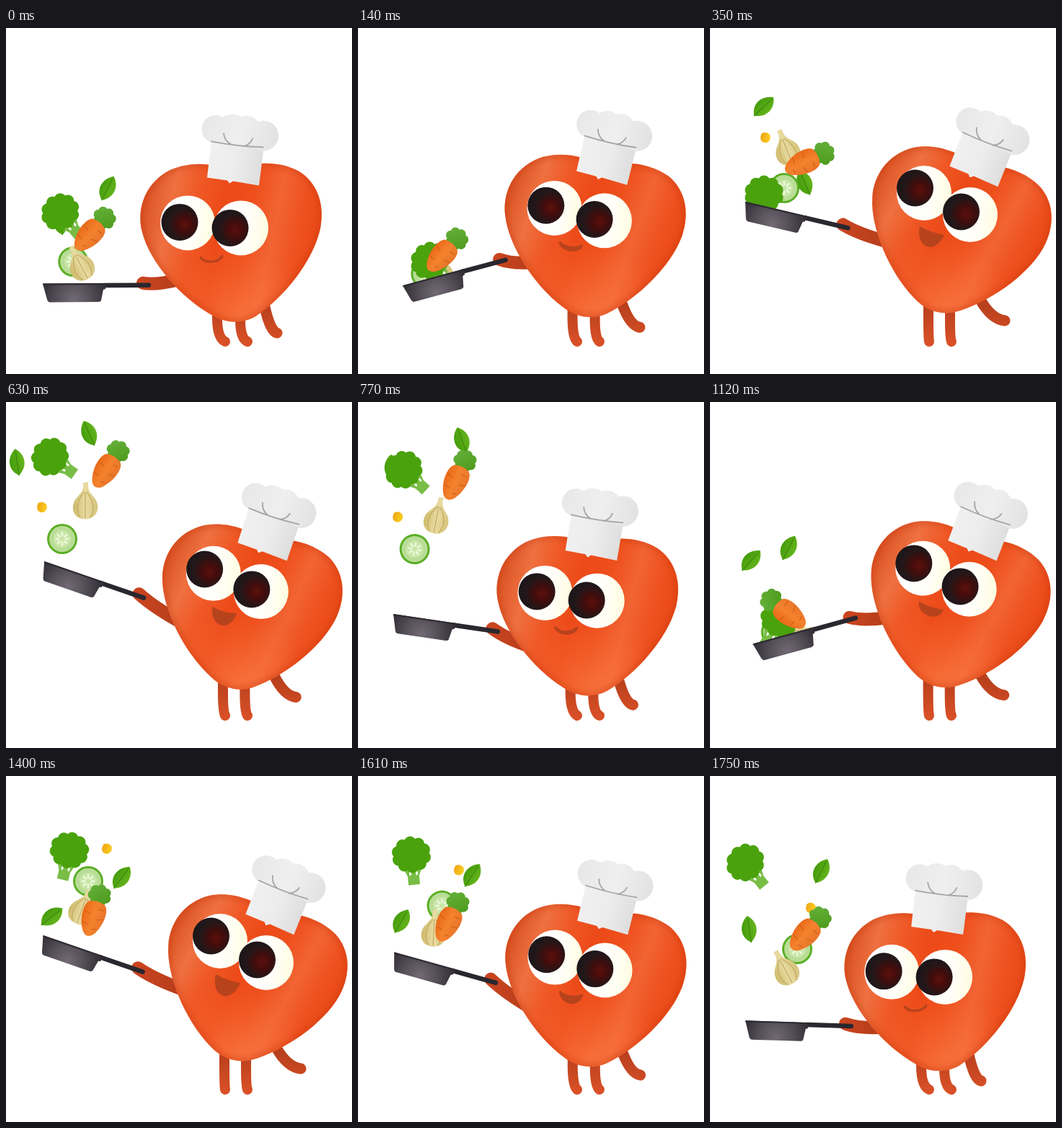
Recreate the animation shown at these times as an HTML page with a canvas. Size 480x480 px, loop 1820 ms.

```html
<!DOCTYPE html>
<html lang="en">
<head>
<meta charset="utf-8">
<title>Heart chef tossing vegetables</title>
<style>
  html, body { margin: 0; width: 100%; height: 100%; overflow: hidden; background: #fff; }
  canvas { display: block; width: 100vmin; height: 100vmin; }
</style>
</head>
<body>
<canvas id="stage" width="480" height="480"></canvas>
<script>
const ctx = document.getElementById('stage').getContext('2d');
const LOOP = 1820, SWING = LOOP / 2, STEP = 70;

// --- easing ---
const ramp = (t, from, to) => Math.min(1, Math.max(0, (t - from) / (to - from)));
const smooth = u => u * u * (3 - 2 * u);
const easeIn = u => u * u;
const easeOut = u => 1 - (1 - u) * (1 - u);
const hold = (t, rise, top, fall, end) => smooth(ramp(t, rise, top)) - smooth(ramp(t, fall, end));
const bump = (t, center, half) => Math.cos(Math.min(1, Math.abs(t - center) / half) * Math.PI / 2) ** 2;
const mix = (a, b, u) => a.map((v, i) => v + (b[i] - v) * u);

// --- drawing helpers ---
function placed([x, y, turn], draw) {
  ctx.save();
  ctx.translate(x, y);
  ctx.rotate(turn * Math.PI / 180);
  draw();
  ctx.restore();
}
function fill(path, paint) {
  ctx.fillStyle = paint;
  ctx.fill(new Path2D(path));
}
function line(path, paint, width) {
  ctx.strokeStyle = paint;
  ctx.lineWidth = width;
  ctx.lineCap = ctx.lineJoin = 'round';
  ctx.stroke(new Path2D(path));
}
function oval(x, y, rx, ry, paint) {
  ctx.fillStyle = paint;
  ctx.beginPath();
  ctx.ellipse(x, y, rx, ry, 0, 0, 7);
  ctx.fill();
}
function stops(gradient, colors) {
  colors.forEach((color, i) => gradient.addColorStop(i / (colors.length - 1), color));
  return gradient;
}
const linear = (x0, y0, x1, y1, ...colors) => stops(ctx.createLinearGradient(x0, y0, x1, y1), colors);
const radial = (x, y, r, ...colors) => stops(ctx.createRadialGradient(x, y, 0, x, y, r), colors);

// --- vegetables ---
function florets(rx, ry, size, count, paint) {
  oval(0, 0, rx, ry, paint);
  for (let i = 0; i < count; i++) {
    const a = i / count * 2 * Math.PI - Math.PI / 2;
    oval(Math.cos(a) * rx, Math.sin(a) * ry, size, size, paint);
  }
}
function leaf() {
  fill('M1 -19C14 -9 14 8 0 18C-14 9 -13 -9 1 -19', linear(-12, 0, 12, 0, '#429a0a', '#66b51d'));
  line('M1 -15L0 18', '#3b870c', 1.2);
}
function corn() {
  fill('M-6 -5Q0 -10 6 -4Q9 3 2 7Q-6 8 -7 1Z', linear(-6, 0, 7, 3, '#f0a916', '#fbd21f'));
}
function cucumber() {
  oval(0, 0, 21, 21, '#5bae25');
  oval(0, 0, 18, 18, '#b9dd96');
  oval(0, 0, 12, 12, '#c8e6a8');
  for (let i = 0; i < 8; i++) {
    placed([0, 0, i * 45], () => oval(0, -6.5, 1.4, 3.4, '#edf8d9'));
  }
}
function garlic() {
  fill('M-3 -30L4 -31C3 -20 6 -17 12 -10C20 -1 19 14 8 19Q0 22 -8 19C-19 14 -20 -1 -11 -10C-5 -17 -2 -20 -3 -30',
    linear(-17, 0, 17, 0, '#cdb968', '#e9dba2', '#d5c37b'));
  line('M-2 -17C-12 -4 -13 8 -7 18M0 -17L0 19M2 -17C12 -4 13 8 7 18', '#bfa95f', 1.2);
}
function broccoli() {
  fill('M-13 18L13 18L8 30L8 42L-8 42L-8 30Z', '#78bd45');
  oval(-4, 26, 1.5, 3, '#fff');
  oval(5, 26, 1.5, 3, '#fff');
  florets(19, 17, 8.5, 10, '#4aa20c');
}
function carrot() {
  placed([0, -34, 0], () => florets(10, 9, 6.5, 7, linear(-16, -10, 14, 12, '#65b03a', '#4c9a1c')));
  fill('M-12 -22C-5 -26 6 -26 12 -22C19 -15 17 6 8 20Q0 29 -7 21C-17 8 -19 -14 -12 -22',
    linear(-16, 0, 16, 0, '#ea6a18', '#f4822d', '#ea752a'));
  line('M-14 -8L-6 -6M15 -3L6 0M-12 8L-4 9M8 13L3 14M5 -15L12 -15', '#cf6118', 1.2);
}

// Each toss: launch from the pan, two poses in the air, then the fall back.
const tosses = [
  { launch: 230, first: 350, last: 630, drift: easeOut, gravity: 2.2, fall: 1, spin: 85 },
  { launch: 1140, first: 1400, last: 1750, drift: easeIn, gravity: 1, fall: .26, spin: 0 }
];
// rest: seat in the pan; fall: ms in free fall; air: x, y, turn of the two airborne poses per toss
const foods = [
  { draw: leaf, rest: [6, -14], fall: 620, sway: 38, spinWay: 1, air: [[131,215,-25], [115,44,-25], [160,141,35], [154,132,25]] },
  { draw: leaf, rest: [-14, -12], fall: 620, sway: 38, spinWay: 1, air: [[74,109,45], [15,84,-10], [63,195,50], [54,213,-10]] },
  { draw: corn, rest: [10, -18], fall: 400, sway: 0, spinWay: 1, air: [[77,152,0], [50,146,0], [140,101,10], [140,183,0]] },
  { draw: cucumber, rest: [-10, -5], fall: 350, sway: 0, spinWay: 1, air: [[103,222,0], [78,190,0], [114,146,0], [121,240,0]] },
  { draw: garlic, rest: [9, -6], fall: 350, sway: 0, spinWay: 1, air: [[107,170,-22], [110,142,0], [105,186,20], [105,270,-28]] },
  { draw: broccoli, rest: [-5, -23], fall: 420, sway: 0, spinWay: 1, air: [[75,230,0], [61,76,-55], [88,103,13], [49,120,-39]] },
  { draw: carrot, rest: [10, -28], fall: 420, sway: 0, spinWay: -1, air: [[127,188,65], [137,97,33], [120,198,17], [130,222,42]] }
];

function foodPose({ rest, fall, sway, spinWay, air }, t, seat) {
  if (t < tosses[0].launch) t += LOOP;
  const caught = tosses[0].last + fall;
  const i = t < caught ? 0 : 1, toss = tosses[i];
  const [first, last] = air.slice(2 * i, 2 * i + 2);
  const inPan = turn => [seat[0] + rest[0], seat[1] + rest[1], turn];

  if (t < toss.first) {
    const turn = i ? air[1][2] + tosses[0].spin * spinWay : air[3][2];
    const launch = i ? Math.max(toss.launch, caught) : toss.launch;
    return mix(inPan(turn), first, easeOut(ramp(t, launch, toss.first)));
  }
  if (t < toss.last) return mix(first, last, toss.drift(ramp(t, toss.first, toss.last)));

  const dropped = ramp(t, toss.last, toss.last + fall * toss.fall) ** toss.gravity;
  const pose = mix(last, inPan(last[2] + toss.spin * spinWay), dropped);
  pose[0] += sway * Math.sin((t - toss.last) / 150) * (1 - dropped);
  return pose;
}

// --- chef ---
function drawLegs([left, middle, x, y, footX, footY]) {
  const skin = linear(0, 385, 0, 438, '#b8401d', '#d95027');
  line(`M${left} 385L${left} 402Q${left} 430 304 435`, skin, 14);
  line(`M${middle} 388L${middle} 405Q${middle} 431 335 435`, skin, 14);
  line(`M${x} ${y}Q${x + (footX - x) * .45} ${footY - 2} ${footX} ${footY}`, skin, 15);
}

function drawArm(hand, shoulder) {
  const [x, y] = hand, bend = mix(hand, shoulder, .35);
  const skin = linear(x - 10, 0, shoulder[0], 0, '#cc4520', '#b43d1a');
  line(`M${x} ${y}Q${bend[0]} ${bend[1] + 5} ${shoulder}`, skin, 18);
}

function drawHeart() {
  const outline = 'M1 -98C-26 -115 -66 -112 -89 -99C-121 -80 -131 -45 -123 -15C-113 25 -71 75 -26 100' +
    'C-6 112 17 112 35 101C74 75 114 25 124 -20C131 -55 119 -85 94 -100C64 -116 24 -113 1 -98Z';
  fill(outline, linear(-126, -25, 126, 25, '#dc5626', '#ef7040', '#ef5724', '#ec4a18', '#ee4f1c', '#f26434', '#ee501e', '#e94814'));
  fill(outline, radial(8, 105, 105, 'rgba(255,138,82,.5)', 'rgba(255,125,70,0)'));
  ctx.save();
  ctx.clip(new Path2D(outline));
  ctx.filter = 'blur(4px)';
  line(outline, 'rgba(200,55,12,.5)', 7);
  ctx.restore();
}

function drawEyes(eyes, pupils) {
  for (const i of [0, 2]) {
    const [x, y] = eyes.slice(i), [px, py] = pupils.slice(i);
    oval(x, y, 38, 38, linear(x - 38, y, x + 38, y + 8, '#fff', '#fff', '#fffef5', '#fffce0'));
    oval(px, py, 25.5, 25.5, radial(px + 7, py + 3, 33, '#5c100d', '#410d0c', '#231719', '#1b1619'));
  }
}

function drawMouth([ax, ay, bx, by, sag, depth]) {
  const dx = bx - ax, dy = by - ay, length = Math.hypot(dx, dy);
  const point = (along, drop) => `${ax + dx * along - dy / length * drop} ${ay + dy * along + dx / length * drop}`;
  const shape = `M${ax} ${ay}C${point(.25, sag)} ${point(.75, sag)} ${bx} ${by}` +
    `C${point(.9, depth)} ${point(.15, depth)} ${ax} ${ay}Z`;
  fill(shape, '#b7431d');
  line(shape, '#b7431d', 3);
}

function drawHat() {
  ctx.translate(-314, -214);
  fill('M284 157L357 165L350 220L314 214L309 217L306 213L278 209Z', linear(282, 185, 354, 195, '#f0f0f0', '#ececec', '#dedede'));
  const puff = linear(272, 140, 377, 156, '#e8e8e8', '#efefef', '#e2e2e2');
  for (const [x, y, r] of [[290, 142, 19.5], [313, 141, 20], [332, 143, 20], [356, 151, 21]]) oval(x, y, r, r, puff);
  oval(322, 152, 38, 13, puff);
  line('M284 159Q320 166 356 167M301 148Q302 158 311 163M341 155Q338 163 329 166', '#a5a5a5', 1.8);
}

function drawPan() {
  line('M85 3L147 3', '#2b272e', 6.5);
  fill('M0 0L88 0L87 8L84 9L81 24Q80 26 77 26L10 26Q7 26 6 22Z', radial(43, 22, 46, '#716a74', '#554f58', '#332f37'));
  line('M1 1L87 1', '#2d2a31', 2);
}

function render(t) {
  const phase = t % SWING;
  const lean = hold(phase, 60, 230, 540, 850);
  const lift = hold(phase, 150, 415, 630, 890);
  const leaning = (upright, tilted) => mix(upright, tilted, lean);

  const pan = [
    49 + 13 * bump(phase, 150, 200) + 5 * bump(phase, 580, 180),
    352 - 131 * lift + 7 * bump(phase, 90, 150),
    19 * lift - 18 * bump(phase, 195, 210)
  ];
  const angle = pan[2] * Math.PI / 180;
  const alongPan = d => [pan[0] + d * Math.cos(angle), pan[1] + d * Math.sin(angle)];

  ctx.clearRect(0, 0, 480, 480);
  drawLegs(leaning([293, 325, 359, 387, 376, 423], [303, 333, 375, 377, 409, 406]));
  drawArm(alongPan(139), leaning([240, 349], [248, 297]));
  placed([0, -7 * bump(phase, 75, 110), 0], () => {
    placed(leaning([312, 300, 0], [338, 287, 17.5]), drawHeart);
    drawEyes(leaning([252, 272, 326, 279], [297, 229, 361, 259]), leaning([241, 271, 311, 279], [284.5, 222, 348.5, 255]));
    drawMouth(leaning([270, 320, 300, 318, 9, 9], [292, 277, 323, 288, 2, 14 + 15 * lift]));
    placed(leaning([315, 214, 0], [366, 205.5, 14.5]), drawHat);
  });
  for (const food of foods) placed(foodPose(food, t, alongPan(44)), food.draw);
  placed(pan, drawPan);
}

const start = performance.now();
function tick() {
  const elapsed = (performance.now() - start) % LOOP;
  render(Math.floor(elapsed / STEP) * STEP);
  requestAnimationFrame(tick);
}
tick();
</script>
</body>
</html>
```
